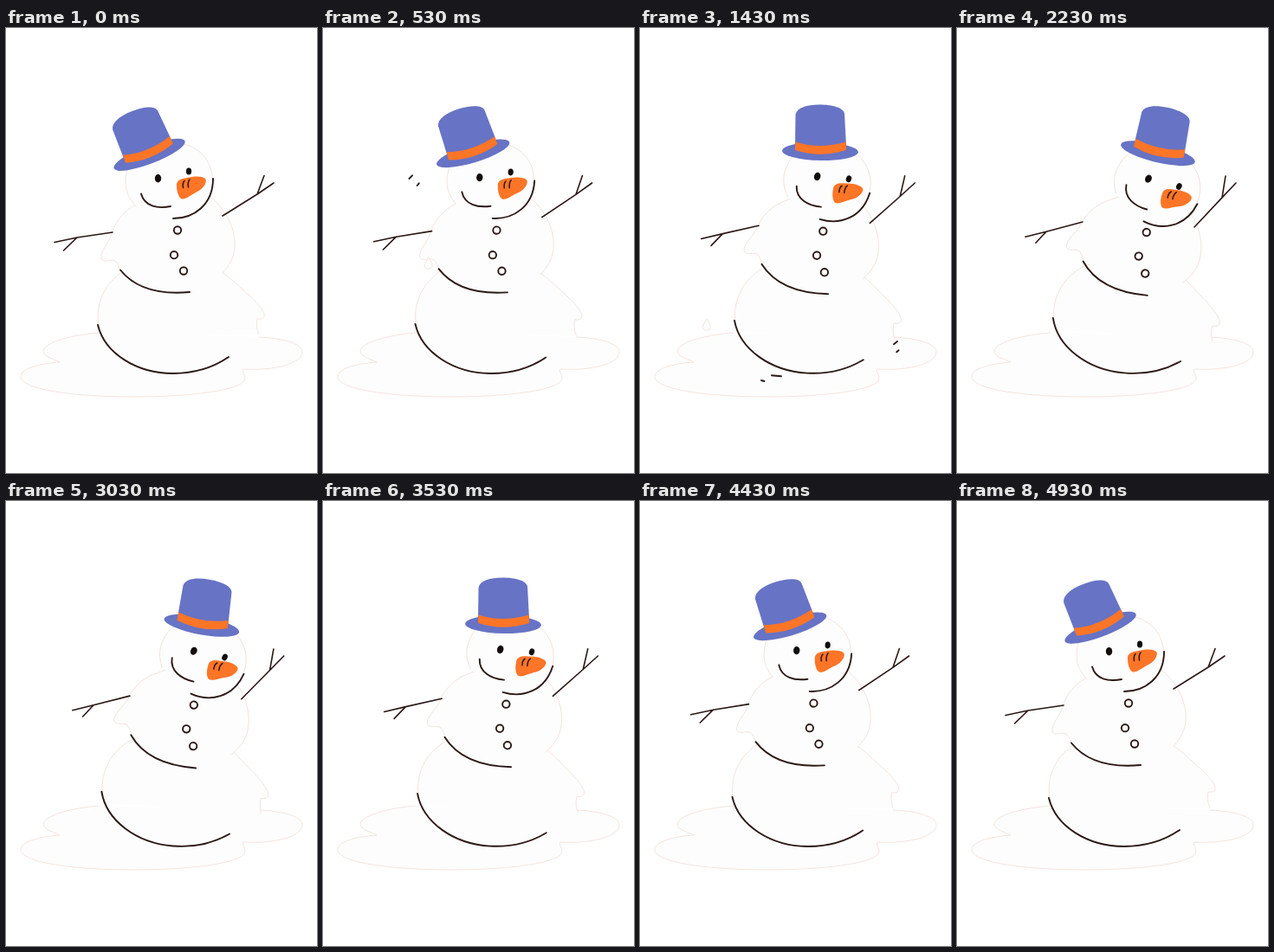
These frames come from a looping animation (359 px wide and 514 px high, 5.01 s). An HTML page:

```html
<!DOCTYPE html>
<html lang="en">
<head>
<meta charset="utf-8">
<title>Snowman</title>
<style>
  html, body { margin: 0; width: 100%; height: 100%; overflow: hidden; background: #fff; }
  svg { display: block; width: 100vw; height: 100vh; }
  .snow { fill: #fdfdfd; stroke: #f1ddd5; stroke-width: .8; }
  .ink { fill: none; stroke: #2b1815; stroke-width: 1.9; stroke-linecap: round; stroke-linejoin: round; }
  .arm { stroke-width: 1.6; }
  .eye { fill: #120c0b; }
  .blue { fill: #6773c4; }
  .orange { fill: #fd7527; }
</style>
</head>
<body>
<svg viewBox="0 0 359 514">
  <path class="snow" d="M108 352C80 354 45 362 43 373C43 380 55 382 62 386C35 388 17 394 17 403C18 418 80 426 148 426C215 426 275 418 276 405C276 400 272 397 274 394C310 396 342 388 342 374C342 364 318 358 292 357"/>

  <g id="base">
    <path class="snow" d="M110 356Q106 345 106 335C106 310 118 293 135 281L170 265H230L250 283C258 287 270 300 281 309C287 315 295 322 298 330C299 334 296 337 290 336C289 341 289 348 292 354"/>
    <path class="ink" d="M106 343C114 376 151 399 193 399C219 399 241 391 257 380"/>
  </g>

  <g id="belly">
    <path class="snow" d="M133 281C130 276 130 272 126 269C120 266 115 272 110 267C108 258 118 250 122 238C126 222 138 210 150 204L175 190L230 190C250 205 262 224 264 245C265 258 262 270 250 283"/>
    <path class="ink" d="M132 279.500C150 302 179 308 212 305"/>
    <g class="ink">
      <circle cx="198" cy="233.500" r="4.200"/>
      <circle cx="194" cy="262.200" r="4.200"/>
      <circle cx="205" cy="280.500" r="4.200"/>
    </g>
  </g>

  <path id="armL" class="ink arm"/>
  <path id="armR" class="ink arm"/>

  <g id="head">
    <path class="snow" d="M150 206C141 196 138 188 138 178C138 150 160 132 190 132C219 132 237.500 150 238.500 175C239 205 215 220 193 220"/>
    <path class="ink" d="M193 220C217 220 239 204 239 174"/>
    <path class="ink" d="M156 191.500C160 206 175 209 190 206"/>
    <ellipse class="eye" cx="175.500" cy="173.700" rx="3.700" ry="4.700"/>
    <ellipse class="eye" cx="211" cy="165.500" rx="3.100" ry="4"/>
    <g id="nose">
      <path class="orange" d="M197 183C196 176 202 174 209 173C217 171 226 170.500 230 174C233 178 227 187 219 190C213 193 208 198 203 197.500C199 196 197 188 197 183Z"/>
      <path class="ink" style="stroke-width:1.500" d="M204.500 184.500Q203.500 179 206 176.500M210.500 184Q209.500 178 212 175"/>
    </g>
  </g>

  <g id="hatSway"><g id="hatTilt">
    <ellipse class="blue" cx="208" cy="142.500" rx="44" ry="10.500" transform="rotate(1 208 142.500)"/>
    <path class="blue" d="M179 136L179.500 100C181 92 193 88.500 207 88.500C222 88.500 235 92 236 99L238 136Q208 146 179 136Z"/>
    <path class="orange" d="M179.300 131.500Q208 140.500 237.700 131.500L238 141Q208 150.500 179 141Z"/>
  </g></g>

  <path id="flick1" class="ink" d="M99.500 174L103 170.300M108.700 182L110.800 179.300"/>
  <path id="flick2" class="ink" d="M152 401.300L163 402.200M140 407L143.500 408M293 365.200L297 362M296.300 374.300L298.500 372.200"/>
  <path id="drop1" class="snow" d="M0 -7C3 -2 5 1 4 4C2 7 -3 7 -4.500 4C-5 0 -2 -3 0 -7Z"/>
  <path id="drop2" class="snow" d="M0 -7C3 -2 5 1 4 4C2 7 -3 7 -4.500 4C-5 0 -2 -3 0 -7Z"/>
</svg>
<script>
const LOOP = 5010, STEPS = 100;
const HAT_LEAN = .624; // lean at which the hat stands upright
const el = id => document.getElementById(id);
const lean = (id, deg, x, y) => el(id).setAttribute('transform', `rotate(${deg} ${x} ${y})`);

// twig joints as [x, y, travel x, travel y]: shoulder, tip, fork, fork tip
const arms = {
  armL: [[123, 236, 22.500, -12.300], [56, 247.500, 23.500, -6.500], [82, 242, 21.500, -7], [66.500, 257, 25, -9]],
  armR: [[250, 217, 24.600, 13.300], [309, 179, 13.300, 0], [290, 192, 16.400, 4], [298, 170.500, 12.300, .5]]
};

function drawArm(id, s) {
  const [a, b, c, d] = arms[id].map(([x, y, dx, dy]) => `${x + dx * s} ${y + dy * s}`);
  el(id).setAttribute('d', `M${a}L${c}L${b}M${c}L${d}`);
}

function show(id, on) {
  el(id).style.display = on ? '' : 'none';
}

function drawDrop(id, k, first, last, x, y, fall) {
  show(id, k >= first && k <= last);
  el(id).setAttribute('transform', `translate(${x} ${y + fall * (k - first) ** 2})`);
}

// steps alternate between 30 and 70 ms; the last one lasts 80
function stepAt(ms) {
  const t = ms % LOOP;
  return Math.min(STEPS - 1, Math.floor(t / 100) * 2 + (t % 100 >= 30 ? 1 : 0));
}

function draw(ms) {
  const k = stepAt(ms);
  const s = (1 - Math.cos(2 * Math.PI * k / STEPS)) / 2;
  lean('base', 5.1 * s, 200, 395);
  lean('belly', 10.55 * s, 194.4, 350);
  lean('head', 27.7 * s, 197.3, 268.5);
  lean('nose', -7 * s, 193, 178);
  lean('hatSway', 21.2 * (s - HAT_LEAN), 203, 327.5);
  lean('hatTilt', 14.2 * (s - HAT_LEAN), 208, 142.5);
  drawArm('armL', s);
  drawArm('armR', s);
  show('flick1', Math.abs(k - 11) < 4);
  show('flick2', Math.abs(k - 29) < 4);
  drawDrop('drop1', k, 8, 18, 122, 268, .45);
  drawDrop('drop2', k, 18, 31, 77, 255, .727);
}

const start = performance.now();
function tick() {
  draw(Math.max(0, performance.now() - start));
  requestAnimationFrame(tick);
}
draw(0);
requestAnimationFrame(tick);
</script>
</body>
</html>
```
